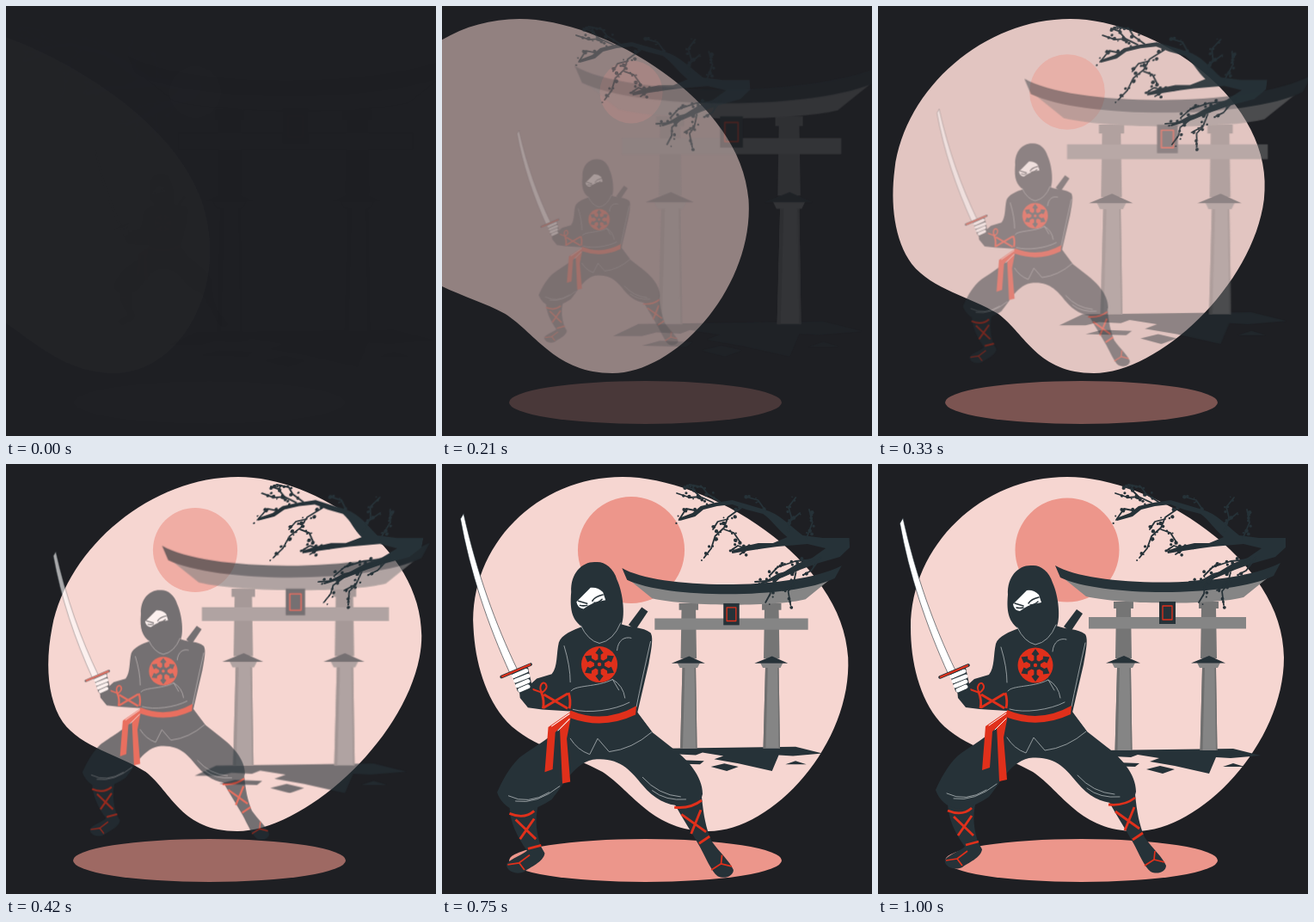
Write an HTML page that moves like this. It is 500 by 500 pixels and loops after 1040 ms.

```html
<!DOCTYPE html>
<html lang="en">
<head>
<meta charset="utf-8">
<title>Ninja at the gate</title>
<style>
html, body { margin: 0; width: 100%; height: 100%; overflow: hidden; background: #1e1f23 }
svg { display: block; width: 100%; height: 100% }
.dark { fill: #263238 }
.red { fill: #e0301b }
.white { fill: #fff }
.line { fill: none; stroke: #a0a7aa; stroke-width: .9; stroke-linecap: round }
.wrap { fill: none; stroke: #e0301b; stroke-width: 2.8; stroke-linejoin: round }
.ink { fill: none; stroke: #263238; stroke-width: 1.5; stroke-linecap: round }
#twigs { fill: none; stroke: #263238; stroke-linecap: round; stroke-linejoin: round }
</style>
</head>
<body>
<svg viewBox="0 0 500 500">
  <defs>
    <g id="pillar">
      <path fill="#757575" d="M-12 160h23v8h-23zM-9 168H8L9 226H-10z"/>
      <path fill="#858585" d="M-14 231H13L10 237H-11zM-8 237H8L9.500 333H-10.500z"/>
      <path fill="#6f6f6f" d="M-8 237H-5L-7.500 333H-10.500zM6.500 237H8L9.500 333H8z"/>
      <path class="dark" d="M-21 231.500L0 223 19 231.500z"/>
    </g>
    <path id="spoke" d="M-1.600 0V-11L-4.500 -13 0 -19 4.500 -13 1.600 -11V0z"/>
  </defs>

  <path id="blob" fill="#f6d6d1" d="M220 15C318 15 472 110 472 225C472 325 375 427 300 427C235 427 215 382 180 358C145 338 100 330 72 300C48 272 38 230 38 190C38 95 120 15 220 15z"/>
  <circle id="sun" fill="#ed968b" cx="220" cy="100" r="60.500"/>

  <g id="gate">
    <path class="dark" d="M238 343L259 333 413 331 445 339 410 342 393 341 385 360 345 351 316 346 327 342 302 338 294 341 274 340 262 343z
      M262 351L277 347 304 348 299 352zM312 355L328 351 345 355 331 360zM401 352L413 348 426 352z"/>
    <use href="#pillar" x="286"/>
    <use href="#pillar" x="385"/>
    <path fill="#858585" d="M216 133C250 149 420 151 456 130L425 155C390 164 285 164 242 154z"/>
    <path class="dark" d="M206 118C250 144 410 145 468 115L460 130C410 155 260 155 212 132z"/>
    <path fill="#858585" d="M245 178h183v13.500h-183z"/>
    <path class="dark" d="M327 160h19v26h-19z"/>
    <path class="wrap" style="stroke-width:1.300" d="M331 165h11v16h-11z"/>
  </g>

  <g id="branch">
    <path class="dark" d="M474 86L443 86 420 83C405 71 394 58 377 53L357 47 340 42 320 45 303 49 293 57 277 63L278 66 296 61 306 53 322 49 340 47 356 53 375 58C386 66 391 76 402 85L385 92 368 92 350 96 336 101 337 104 355 101 375 98 390 96 425 93 446 98 430 109 412 116 392 128 368 138 369 140 394 132 415 123 434 116 462 108 474 97z"/>
    <g id="twigs"></g>
  </g>

  <ellipse id="shadow" fill="#ec968b" cx="236.500" cy="461" rx="158.500" ry="25"/>

  <g id="ninja">
    <path class="white" d="M29 63L25.500 69C36 128 56 188 82 245L90 240C65 188 44 130 29 63z"/>
    <path class="ink" style="stroke-width:.6" d="M29 63L25.500 69C36 128 56 188 82 245M90 240C65 188 44 130 29 63"/>
    <path class="dark" d="M216 189L231 169 238 174 224 195z"/>

    <!-- legs and feet -->
    <path class="dark" d="M81 393L114 392C109 410 112 428 117 441L121 448C120 458 104 464 98 469C86 474 76 466 78 460C84 453 96 450 101 445C90 430 81 412 81 393z
      M267 390L299 384C301 405 304 420 310 434C319 447 331 457 335 467C335 474 325 478 317 474C310 469 303 452 297 441C288 425 277 408 267 390z"/>
    <path class="dark" d="M147 295C130 318 105 329 92 340C80 352 73 366 67 379C70 388 77 396 86 399C100 405 120 393 129 387C142 372 155 343 180 341.500C207 340 219 355 232 371C245 387 262 395 277 394C288 394 299 390 300 381C300 360 282 341 266 329L243 311 226 288z"/>
    <path class="wrap" d="M81 403Q98 410 109 400M88 410L111 432M109 409L93 432M102 443L117 439M268 396Q286 398 299 388M276 404L304 424M298 399L287 426M296 437L308 429"/>
    <path class="wrap" style="stroke-width:1.700" d="M79 461L92 459 104 450M92 459L98 467M310 467L321 460 322 450M321 460L333 463"/>
    <path class="line" d="M80 383Q102 394 126 379M88 389Q112 393 138 372M232 362Q250 382 275 384M243 377Q258 389 281 387"/>

    <!-- torso and arms -->
    <path class="dark" d="M164 191C153 195 140 200 137 209C134 222 136 236 129 245L112 250 103 258 92 262 93 272 102 283 118 285 150 287 150 318C160 330 171 336 181 336C197 333 215 330 243 311L226 289 239 233C243 212 244 203 241 198C232 191 220 193 207 188z"/>
    <path class="line" d="M143 213Q150 236 150 254M151 264C156 257 180 260 198 251Q210 258 212 272M203 218C204 206 212 202 219 204M241 208Q231 252 225 282M153 285C170 290 200 286 217 277M150 318Q158 331 172 336L181 318 194 333Q220 330 242 311M198 251L205 263"/>
    <circle class="red" cx="183" cy="234" r="20.500"/>
    <g id="star" class="dark" transform="translate(183 234)"></g>
    <circle class="dark" cx="183" cy="234" r="6"/>
    <circle class="red" cx="183" cy="234" r="2.200"/>

    <!-- belt -->
    <path class="red" d="M150 286Q188 302 225 281L224 291Q188 308 151 295z"/>
    <path class="red" d="M151 287L125 305 121 356 130 353 133 311 151 294zM151 292L138 304 141 369 150 367 146 318z"/>
    <path class="ink" style="stroke:#fff;stroke-width:1" d="M129 304L149 290M136 309L149 296"/>

    <!-- wrist and hand -->
    <path class="wrap" d="M117 265Q121 275 119 284M148 266Q151 275 149 284M120 268L147 284M120 283L147 267"/>
    <path class="wrap" style="stroke-width:2" d="M118 266C113 259 119 252 122 256C125 260 121 264 118 266L107 262"/>
    <path class="dark" d="M83 243L102 237 108 265 99 272 90 264z"/>
    <path class="ink" style="stroke:#fff;stroke-width:4.800" d="M86 247L100 241M88 252.500L102 247M90 258L102 253M93 263L102 259"/>
    <path class="ink" style="stroke-width:3.600" d="M72 248L105 234"/>
    <path class="wrap" style="stroke-width:2.100" d="M72 248L105 234"/>

    <!-- head -->
    <path class="dark" d="M179 118C164 117 150 130 151 152C149 174 153 184 164 192Q169 207 182 210Q200 207 207 191C213 181 210 153 203 138C199 124 188 117 179 118z"/>
    <path class="line" d="M162 190Q170 207 183 210Q199 207 207 187"/>
    <path class="white" d="M157 163L173 147Q181 146 187 152L190 161Q175 163 165 171Q158 170 157 163z"/>
    <path class="ink" d="M159 162L169 165M161 167Q165 168 169 167M175 162Q178 157 187 155M177 164Q182 164 186 160"/>
  </g>
</svg>
<script>
const $ = id => document.getElementById(id);
const NS = 'http://www.w3.org/2000/svg';

function add(parent, tag, attrs) {
  const el = document.createElementNS(NS, tag);
  for (const k in attrs) el.setAttribute(k, attrs[k]);
  return parent.appendChild(el);
}

for (let a = 0; a < 360; a += 60) add($('star'), 'use', { href: '#spoke', transform: `rotate(${a})` });

// Twigs carry blossoms scattered along their length.
let seed = 7;
const rand = () => (seed = seed * 16807 % 2147483647) / 2147483647;
const twigs = [
  'M318 45L303 38 291 39 276 34', 'M303 38L294 29 285 26', 'M326 44L312 35 306 27 291 24',
  'M301 55L286 52 277 65', 'M350 51L334 62 329 74 318 84 313 98 304 109',
  'M334 64L322 67 316 76', 'M329 76L340 80 347 91', 'M375 96L354 98 344 95 335 101',
  'M357 98L346 105', 'M378 54L370 42 356 38', 'M403 79L408 62 405 50 414 39',
  'M424 87L432 68 429 53', 'M408 65L418 57', 'M433 111L410 113 389 120 379 130',
  'M412 123L390 128 376 136 362 137', 'M392 131L380 141 379 151 373 161',
  'M410 126L406 141 400 148 402 164', 'M406 140L394 147', 'M440 108L428 124 420 128'
];
for (const d of twigs) {
  const twig = add($('twigs'), 'path', { d, 'stroke-width': 1.8 });
  for (let s = 4, end = twig.getTotalLength(); s <= end; s += 4.5) {
    const { x, y } = twig.getPointAtLength(s);
    add($('twigs'), 'circle', {
      cx: x + rand() * 8 - 4, cy: y + rand() * 8 - 4, r: .8 + rand() * 1.5,
      fill: '#263238', stroke: 'none'
    });
  }
}

// cubic-bezier(.36, -.01, .5, 1.38)
function ease(x) {
  const curve = (a, b, s) => 3 * (1 - s) ** 2 * s * a + 3 * (1 - s) * s * s * b + s ** 3;
  let lo = 0, hi = 1;
  for (let i = 0; i < 30; i++) {
    const mid = (lo + hi) / 2;
    if (curve(.36, .5, mid) < x) lo = mid; else hi = mid;
  }
  return curve(-.01, 1.38, hi);
}

function pose(id, opacity, transform) {
  $(id).setAttribute('opacity', Math.max(0, Math.min(1, opacity)));
  $(id).setAttribute('transform', transform);
}

function zoom(id, cx, cy, from, p) {
  const s = from + (1 - from) * p;
  pose(id, p, `translate(${cx} ${cy}) scale(${s}) translate(${-cx} ${-cy})`);
}

// Slide in from the left, lean past upright, then settle.
function dash(id, cy, t) {
  const mix = (a, b, start, span) => a + (b - a) * ease((t - start) / span);
  const entering = t < .6;
  const shift = entering ? mix(-250, 0, 0, .6) : 0;
  const skew = entering ? mix(20, -10, 0, .6) : t < .8 ? mix(-10, 2, .6, .2) : mix(2, 0, .8, .2);
  pose(id, entering ? ease(t / .6) : 1, `translate(${shift} ${cy}) skewX(${skew}) translate(0 ${-cy})`);
}

const LOOP = 1040, STEPS = 25;

function draw(now) {
  const step = Math.floor((now % LOOP + 8) * STEPS / LOOP);
  const t = Math.min(1, (step + 1) / STEPS), p = ease(t);
  dash('blob', 221, t);
  dash('branch', 95, t);
  zoom('sun', 220, 100, .5, p);
  zoom('gate', 336.5, 240, 1.5, p);
  zoom('ninja', 182, 270, .5, p);
  pose('shadow', p, '');
  requestAnimationFrame(draw);
}
draw(0);
</script>
</body>
</html>
```
